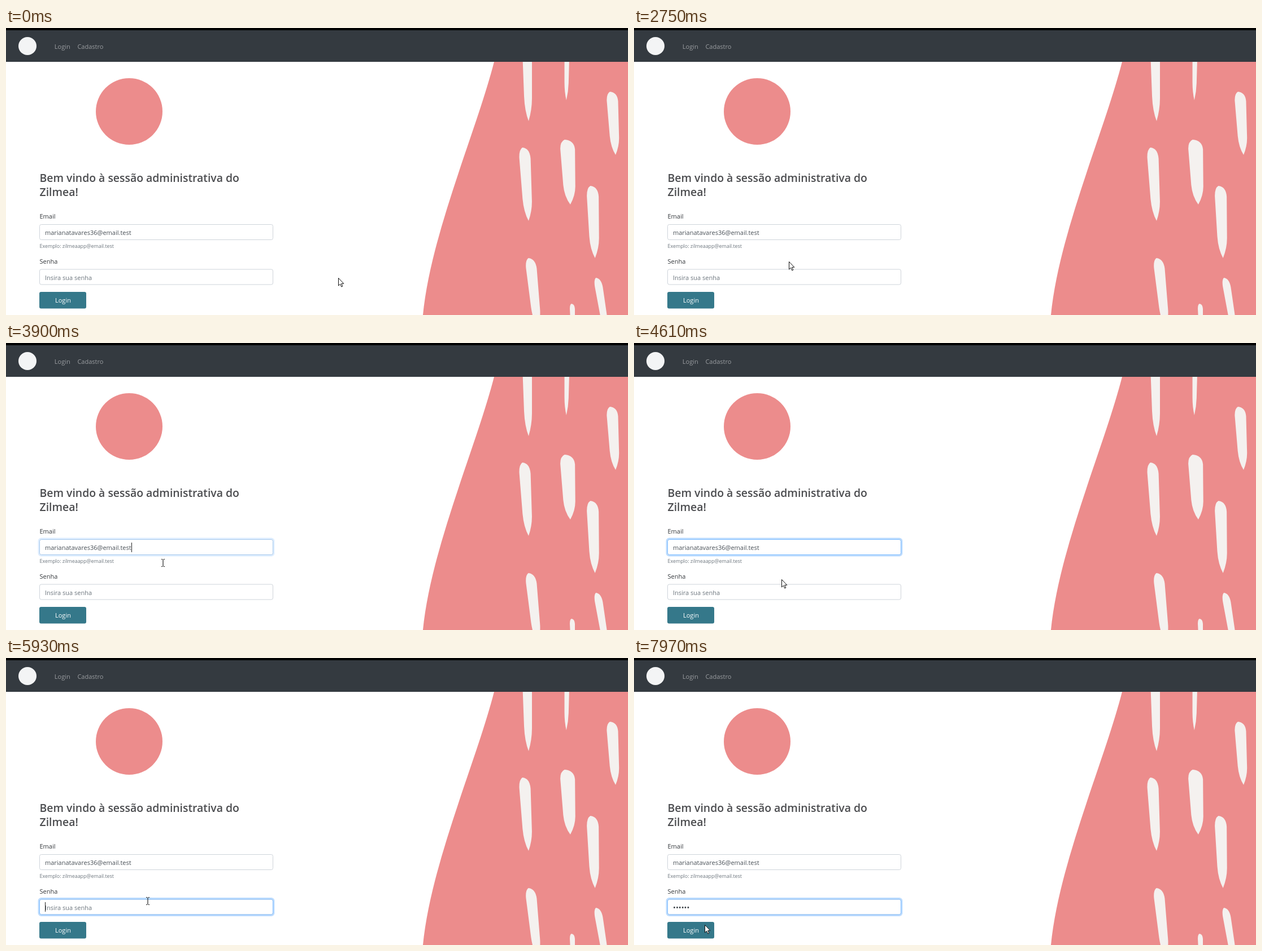
An HTML page that plays this animation: 1101 px wide and 509 px high, repeating every 8000 ms.

```html
<!DOCTYPE html>
<html lang="pt-BR">
<head>
<meta charset="utf-8">
<title>Login</title>
<style>
  html, body { margin: 0; width: 100%; height: 100%; overflow: hidden; background: #fff; }
  svg { display: block; font: 11px "Open Sans", "Noto Sans", sans-serif; }
  .nav { fill: #9a9da0; }
  .title { font-size: 19.4px; font-weight: 600; fill: #4b4c4f; }
  .label { fill: #33373b; }
  .value { fill: #495057; }
  .hint { fill: #6c757d; }
  .small { font-size: 8.9px; }
  .dots { font-size: 13px; fill: #3d4349; }
  .field { fill: #fff; stroke: #ced4da; }
  .focus { fill: none; opacity: 0; }
  .ring { stroke: #007bff; stroke-opacity: .27; stroke-width: 2.4; }
  .edge { stroke: #80bdff; }
  .caret { fill: #222; }
  .pink { fill: #ec8c8c; }
  .seeds { fill: #f4f1ef; }
</style>
</head>
<body>
<svg width="1101" height="509" viewBox="0 0 1101 509">
  <path class="pink" d="M864 60C832 185 752 365 738 509H1101V60Z"/>
  <path class="seeds" id="seeds"/>

  <rect width="1101" height="60" fill="#343a40"/>
  <rect width="1101" height="4"/>
  <circle cx="38" cy="32" r="16" fill="#f3f4f5"/>
  <text class="nav" x="85.8" y="37">Login</text>
  <text class="nav" x="126.4" y="37">Cadastro</text>

  <circle class="pink" cx="218" cy="148" r="59"/>
  <text class="title" x="59.5" y="273">Bem vindo à sessão administrativa do</text>
  <text class="title" x="59.5" y="298">Zilmea!</text>

  <text class="label" x="59.5" y="338">Email</text>
  <rect class="field" x="59.5" y="348.5" width="413" height="27" rx="3"/>
  <g class="focus" id="emailFocus">
    <rect class="ring" x="57.8" y="346.8" width="416.4" height="30.4" rx="4.5"/>
    <rect class="edge" x="59.5" y="348.5" width="413" height="27" rx="3"/>
  </g>
  <text class="value" x="69" y="367">marianatavares36@email.test</text>
  <rect class="caret" id="emailCaret" x="222" y="354" width="1" height="17"/>
  <text class="hint small" x="59.5" y="390">Exemplo: zilmeaapp@email.test</text>

  <text class="label" x="59.5" y="418">Senha</text>
  <rect class="field" x="59.5" y="428" width="413" height="27" rx="3"/>
  <g class="focus" id="passFocus">
    <rect class="ring" x="57.8" y="426.3" width="416.4" height="30.4" rx="4.5"/>
    <rect class="edge" x="59.5" y="428" width="413" height="27" rx="3"/>
  </g>
  <text class="hint" id="hint" x="69" y="446.5">Insira sua senha</text>
  <text class="dots" id="dots" x="69" y="446.7"></text>
  <rect class="caret" id="passCaret" x="69" y="433" width="1" height="17"/>

  <rect x="59" y="468" width="83" height="29.5" rx="3" fill="#35788a"/>
  <text x="87" y="487" fill="#fff">Login</text>

  <g id="pointer">
    <path id="arrow" d="M.5.5V14L3.6 11.1L5.8 16L7.8 15.1L5.7 10.3H9.8Z" fill="#fff" stroke="#111"/>
    <path id="beam" d="M-3-6.5H-.8M.8-6.5H3M0-6V6M-3 6.5H-.8M.8 6.5H3" fill="none" stroke="#222" stroke-width="1.2"/>
  </g>
</svg>
<script>
  const LOOP = 8000, STEP = 77, BLINK = 500, KEY = 190, PITCH = 4.9;
  const $ = id => document.getElementById(id);
  const show = (id, on) => $(id).setAttribute('visibility', on ? 'visible' : 'hidden');

  // One seed: round top, long sides that lean, pointed tip
  function seed(x, y, w, h, lean) {
    const at = (u, v) => `${x + u * w + v * lean} ${y + v * h} `;
    return `M${at(.3, 0)}Q${at(.95, .01)}${at(1, .15)}L${at(1, .72)}Q${at(1, .86)}${at(.65, 1)}` +
      `Q${at(.25, .88)}${at(.18, .7)}L${at(0, .14)}Q${at(0, .03)}${at(.3, 0)}Z`;
  }

  $('seeds').setAttribute('d', [
    seed(914, 20, 17, 145, 0), seed(989, 20, 9, 108, -3), seed(1063, 113, 20, 112, 3),
    seed(908, 212, 20, 130, 4), seed(981, 198, 26, 115, 1), seed(1028, 280, 21, 128, 1),
    seed(919, 408, 19, 125, 10), seed(1040, 443, 14, 110, 16), seed(998, 489, 9, 60, 0)
  ].join(''));

  // Pointer moves: first and last step, then the place reached
  const moves = [
    [200, 360, 398, 409],
    [590, 820, 345, 363],
    [1980, 2750, 274, 414],
    [2830, 3290, 282, 363],
    [3520, 3520, 295, 357],
    [3660, 3900, 278, 390],
    [4000, 4140, 264, 417],
    [4470, 4930, 251, 431],
    [7650, 7970, 125, 473]
  ];

  function pointerAt(t) {
    let x = 588, y = 443;
    for (const [from, to, toX, toY] of moves) {
      if (t < from) break;
      const last = Math.round((to - from) / STEP);
      const gap = (to - from) / last || 1;
      const step = Math.min(last, Math.floor((t - from) / gap + 1e-6));
      const p = (1 - Math.cos(Math.PI * (step + 1) / (last + 1))) / 2;
      x += (toX - x) * p;
      y += (toY - y) * p;
    }
    return [Math.floor(x + 1e-6), Math.floor(y + 1e-6)];
  }

  const overText = (x, y) => x > 59 && x < 473 &&
    (y > 348 && y < 376 || y > 380 && y < 393 || y > 428 && y < 456);

  // A fade caught once halfway
  const fade = (t, half, full) => ((t >= half) + (t >= full)) / 2;

  function draw(t) {
    const [x, y] = pointerAt(t);
    const beam = overText(x, y);
    $('pointer').setAttribute('transform', `translate(${x} ${y})`);
    show('beam', beam);
    show('arrow', !beam);

    const pass = fade(t, 4930, 5100);
    $('passFocus').style.opacity = pass;
    $('emailFocus').style.opacity = fade(t, 3900, 4000) - pass;
    show('emailCaret', t >= 3900 && t < 4470);

    const count = t < 6430 ? 0 : Math.min(6, 2 + Math.floor((t - 6430) / KEY));
    const lit = count || Math.floor((t - 4930) / BLINK) % 2 === 0;
    show('passCaret', t >= 4930 && t < 7650 && lit);
    show('hint', !count);
    $('dots').textContent = '•'.repeat(count);
    $('passCaret').setAttribute('x', Math.round(69 + count * PITCH));
  }

  function tick() {
    draw(performance.now() % LOOP);
    requestAnimationFrame(tick);
  }
  tick();
</script>
</body>
</html>
```
